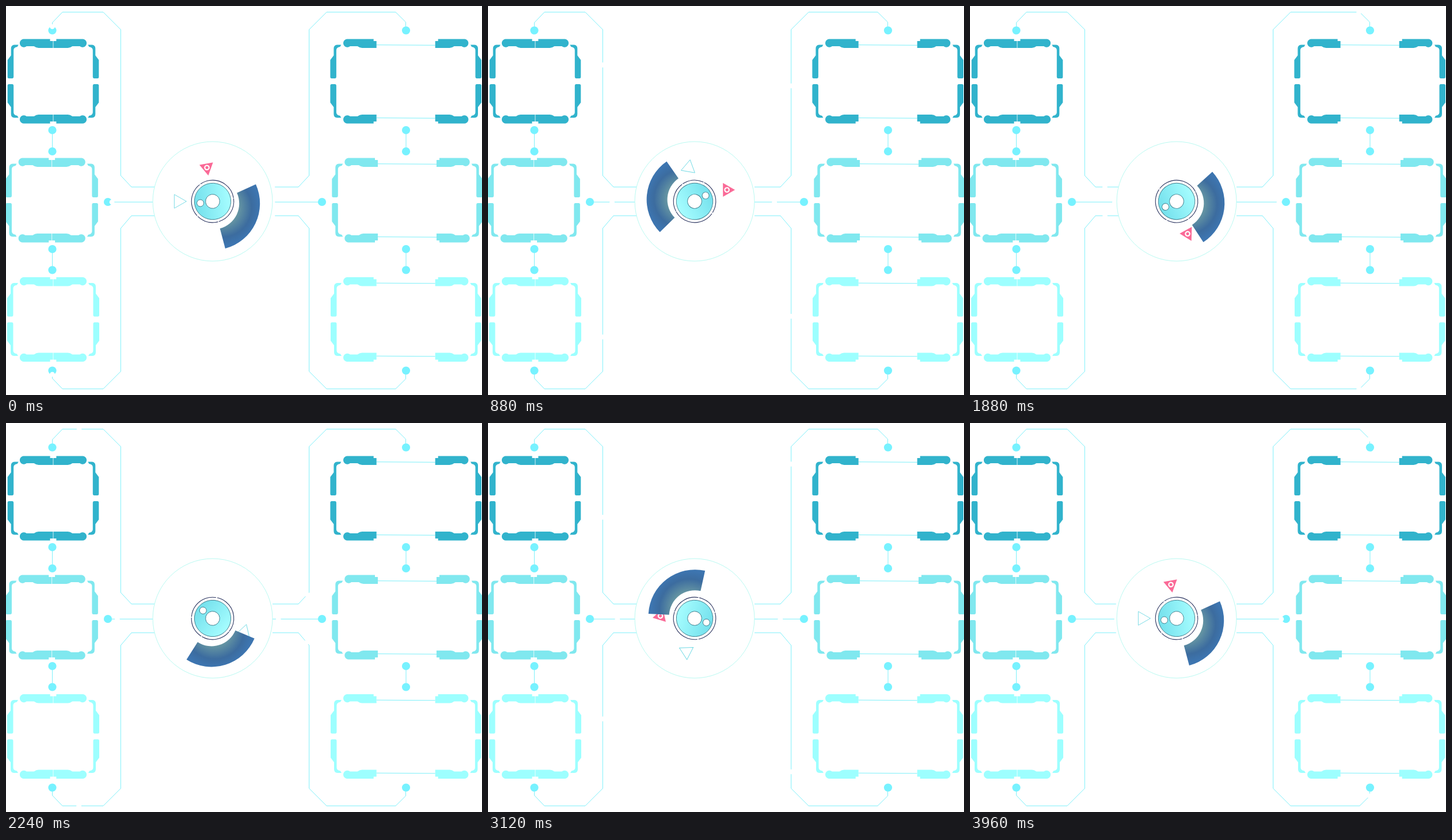
Recreate the animation shown at these times as an HTML page. Size 827 px wide and 677 px high, loop 4000 ms.

```html
<!DOCTYPE html>
<html lang="en">
<head>
<meta charset="utf-8">
<title>Circuit hub</title>
<style>
  html, body { margin: 0; width: 100%; height: 100%; overflow: hidden; background: #fff; }
  svg { display: block; width: 827px; height: 677px; }
  .wire { fill: none; stroke: #7cf0fa; stroke-width: 1; }
  .node { fill: #77f2ff; }
  .pulse { fill: #fff; }
</style>
</head>
<body>
<svg viewBox="0 0 827 677">
  <defs>
    <radialGradient id="fanFill" gradientUnits="userSpaceOnUse" cx="15" cy="7" r="66">
      <stop offset=".42" stop-color="#6797a3"/>
      <stop offset=".78" stop-color="#3c6c9f"/>
      <stop offset="1" stop-color="#3d75b0"/>
    </radialGradient>
    <linearGradient id="discFill">
      <stop offset="0" stop-color="#74e0ec"/>
      <stop offset="1" stop-color="#a6fdff"/>
    </linearGradient>
  </defs>
  <g id="wires"></g>
  <g id="frames"></g>
  <g id="nodes"></g>
  <g id="pulses"></g>
  <g transform="translate(359 340)">
    <circle r="104" fill="none" stroke="#b9faf2"/>
    <g id="outline"><path fill="none" stroke="#6fd9e4" stroke-width=".9" d="M14 0L-7 -12V12Z"/></g>
    <g id="marker">
      <path fill="#fa6a97" d="M14 0L-7 -12V12Z"/>
      <circle r="3.7" fill="none" stroke="#fff" stroke-width="2.3"/>
    </g>
    <g id="fan"><path transform="translate(1.2 3.7)" fill="url(#fanFill)"/></g>
    <g id="disc">
      <circle r="36.8" fill="none" stroke="#2c3560" stroke-width="1.1" stroke-dasharray="52 1.5 38 1.5 61 2 74 1.2"/>
      <circle r="31.7" fill="url(#discFill)" stroke="#3f7d8c" stroke-width=".9"/>
      <circle r="12.3" fill="#fff" stroke="#3f7d8c" stroke-width=".9"/>
      <circle cx="-21.6" r="6" fill="#fff" stroke="#3f7d8c" stroke-width=".9"/>
    </g>
  </g>
</svg>
<script>
const STEP = 40, STEPS = 100;
const byId = id => document.getElementById(id);

function add(parent, tag, attrs) {
  const el = document.createElementNS('http://www.w3.org/2000/svg', tag);
  for (const key in attrs) el.setAttribute(key, attrs[key]);
  return parent.appendChild(el);
}
const wire = (d, extra) => add(byId('wires'), 'path', { class: 'wire', d, ...extra });
const node = (cx, cy) => add(byId('nodes'), 'circle', { class: 'node', cx, cy, r: 7.1 });

// One quarter of a panel border, mirrored into all four corners.
const BAR = 'M-51 -73.5H-5V-70H0V-58H-25Q-29 -58 -33 -61H-46A7.1 7.1 0 1 1 -51 -73.5Z';
const BRACKET = 'M0 -37L6 -45V-57Q6 -63 12 -63.5H19L17 -60Q10.5 -59 10.5 -54V-8Q10.5 -5 8 -5H2.5Q0 -5 0 -7.5Z';

function panel(cx, cy, gap, side, fill) {
  for (const sx of [1, -1]) for (const sy of [1, -1]) {
    const g = add(byId('frames'), 'g', { fill, transform: `translate(${cx} ${cy}) scale(${sx} ${sy})` });
    add(g, 'path', { d: BAR, transform: `translate(${-gap} 0)` });
    add(g, 'path', { d: BRACKET, transform: `translate(${-side} 0)` });
  }
  if (gap > 10) {
    for (const y of [cy - 63, cy + 64])
      wire(`M${cx - gap} ${y - .3}L${cx + gap} ${y + .3}`);
  }
}
panel(82, 131, .4, 79.3, '#31b3cc');
panel(79.7, 338, .4, 80.2, '#80e8ef');
panel(82, 545.5, .4, 80, '#9dffff');
panel(694.7, 131, 51, 131.3, '#31b3cc');
panel(697, 338, 51, 130.7, '#80e8ef');
panel(694.7, 545.5, 51, 130.7, '#9dffff');

for (const x of [80.5, 695]) {
  for (const y of [42.5, 216, 253, 423, 459.5, 634.5]) node(x, y);
  wire(`M${x} 216V253M${x} 423V459`);
}
node(177, 341);
node(549, 341);

// Pulses run inwards on the left and outwards on the right.
const routes = [
  'M80.5 36V29L98 10.7H169L199.3 41V295L218 315H258',
  'M80.5 641V648L98 666.3H169L199.3 636V387L218 365H258',
  'M184 341.2H255',
  'M463 315H508L526.7 295V41L557 10.7H677L694.5 28',
  'M463 365H508L526.7 387V636L557 666.3H677L694.5 649',
  'M463 341.2H541'
].map((d, i) => {
  const path = wire(d, i % 3 === 2 ? { 'stroke-width': 1.6 } : {});
  return {
    path,
    length: path.getTotalLength(),
    pulse: add(byId('pulses'), 'circle', { class: 'pulse', r: 4.3 })
  };
});
wire('M694.5 28V42M694.5 649V634M177 341.2H184M541 341.2H549');

const polar = (r, deg) => {
  const a = deg * Math.PI / 180;
  return `${r * Math.cos(a)} ${r * Math.sin(a)}`;
};
byId('fan').firstChild.setAttribute('d',
  `M${polar(81, -24.3)}A81 81 0 0 1 ${polar(81, 75.2)}L${polar(45, 75.2)}A45 45 0 0 0 ${polar(45, -24.3)}Z`);

const place = (id, transform) => byId(id).setAttribute('transform', transform);

function draw() {
  const step = Math.floor(performance.now() / STEP) % STEPS;
  const turn = 360 * step / (STEPS - 1);
  place('fan', `rotate(${2 * turn})`);
  place('disc', `rotate(${2 * turn - 8})`);
  place('marker', `translate(${polar(59.6, 260.4 + turn)}) rotate(${80 + 2 * turn})`);
  place('outline', `translate(${polar(59.6, 180 + turn)}) rotate(${2 * turn})`);

  const cycles = 2 * step / (STEPS - 1);
  const run = step === STEPS - 1 ? 1 : cycles % 1;
  for (const { path, length, pulse } of routes) {
    const p = path.getPointAtLength(run * length);
    pulse.setAttribute('cx', p.x);
    pulse.setAttribute('cy', p.y);
  }
  requestAnimationFrame(draw);
}
draw();
</script>
</body>
</html>
```
